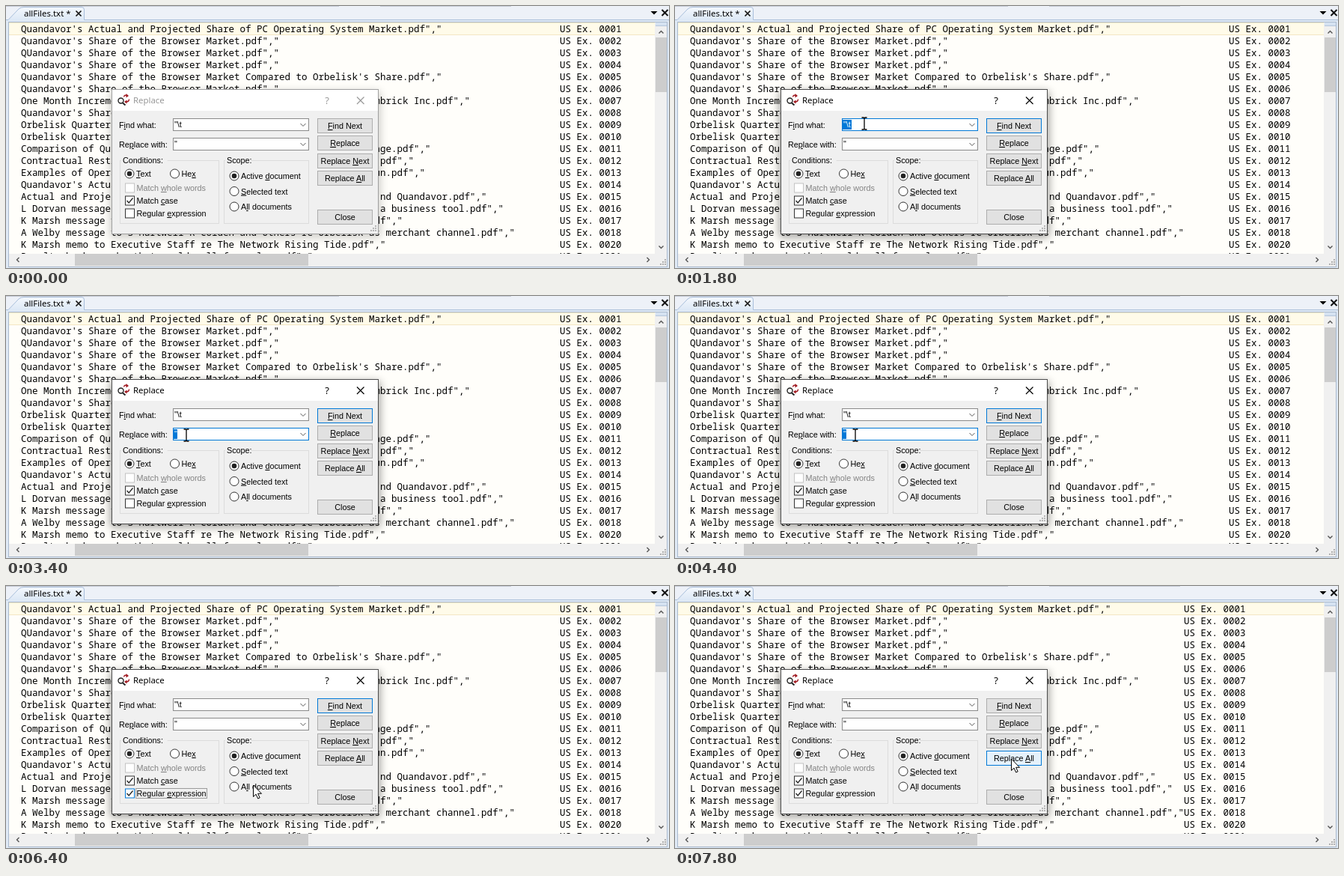
Write an HTML page that moves like this. It is 886 by 350 pixels and loops after 8 s.

```html
<!DOCTYPE html>
<html lang="en">
<head>
<meta charset="utf-8">
<title>Replace dialog</title>
<style>
html, body { margin: 0; width: 100%; height: 100%; overflow: hidden; background: #fff; }
svg { display: block; width: 886px; height: 350px; }
.code { font: 12.5px "Noto Sans Mono", monospace; fill: #000; white-space: pre; }
.ui { font: 10.8px "Liberation Sans", Arial, sans-serif; fill: #000; }
.head { font: 11.4px "Noto Sans", "Open Sans", sans-serif; }
.u { text-decoration: underline; }
.mid { text-anchor: middle; }
</style>
</head>
<body>
<svg id="stage" viewBox="0 0 886 350" xmlns="http://www.w3.org/2000/svg">
  <defs>
    <clipPath id="page"><rect x="4" y="22" width="863" height="309"/></clipPath>
    <filter id="blur" x="-20%" y="-20%" width="140%" height="140%"><feGaussianBlur stdDeviation="6"/></filter>
    <linearGradient id="tabFill" x2="0" y2="1"><stop stop-color="#f4f8fd"/><stop offset="1" stop-color="#dce8f6"/></linearGradient>
  </defs>
  <rect width="886" height="350" fill="#dfe9f5"/>
  <rect width="886" height="18" fill="#edf1f8"/>
  <path d="M0 .5H445M500 .5H675" stroke="#c5cad6"/>
  <path d="M2 19L17 4Q20 1.500 24 1.500H101Q104.500 1.500 104.500 5V19Z" fill="url(#tabFill)"/>
  <path d="M0 18.500H3L17 4Q20 1.500 24 1.500H101Q104.500 1.500 104.500 5V18.500H886" fill="none" stroke="#a9bfdb"/>
  <text class="head" x="24" y="14">allFiles.txt *</text>
  <path d="M93.500 6.500L100.500 13.500M100.500 6.500L93.500 13.500" stroke="#111" stroke-width="1.700"/>
  <path d="M861.500 7H870.500L866 11.500Z"/>
  <path d="M876.500 5L884.500 13M884.500 5L876.500 13" stroke="#111" stroke-width="2"/>
  <rect x="3.500" y="21.500" width="880" height="327" fill="#f0f0f0" stroke="#a9b9cd"/>
  <rect x="4" y="22" width="863" height="309" fill="#fffefa"/>
  <rect x="4" y="22.500" width="863" height="16" fill="#fffbe9"/>
  <path d="M4 22.500H867M4 38.500H867" stroke="#f3e7c4"/>
  <g clip-path="url(#page)"><g id="lines" class="code"></g><g id="labels" class="code"></g></g>

  <rect x="868" y="22" width="15" height="4" fill="#d5e2f1"/>
  <path d="M868 26.500H883" stroke="#b4c6dc"/>
  <rect x="868" y="42" width="15" height="73" fill="#cdcdcd"/>
  <rect x="92" y="331" width="312" height="16" fill="#cdcdcd"/>
  <path d="M872.500 36.500L875.500 33.500L878.500 36.500M872.500 320.500L875.500 323.500L878.500 320.500M17.500 336L14.500 339L17.500 342M856.500 336L859.500 339L856.500 342" fill="none" stroke="#555" stroke-width="1.400"/>
  <g id="pageGrip" fill="#b0b0b0"></g>

  <rect id="shade" x="139" y="114" width="361" height="195" filter="url(#blur)"/>
  <g id="dialog">
    <rect x="141" y="111" width="357" height="194" fill="#f0f0f0"/>
    <rect x="141" y="111" width="357" height="29" fill="#fff"/>
    <rect id="frame" x="141.500" y="111.500" width="356" height="193" fill="none"/>
    <g fill="none" stroke-width="1.400">
      <circle cx="153.500" cy="126.500" r="3.500" fill="#fff" stroke="#222"/>
      <path d="M156 129.500L159.500 132.500" stroke="#222" stroke-width="2"/>
      <path d="M157.500 121.500Q158 118.500 161.500 119.500M164.500 124.500Q164.500 128 160.500 128" stroke="#a01820"/>
    </g>
    <path d="M160.500 117L164 120L160.500 122.500ZM161.500 125.500L158 128L161.500 130.500Z" fill="#a01820"/>
    <text id="title" class="head" x="170" y="130">Replace</text>
    <text id="help" class="head mid" x="429" y="130.500" style="font-size:13px">?</text>
    <path id="shut" d="M469 121.500L478.500 131M478.500 121.500L469 131" stroke-width="1.200"/>
    <g id="controls" class="ui"></g>
  </g>
  <path id="beam" d="M-3.500 -8H-1L0 -7L1 -8H3.500M0 -7V7M-3.500 8H-1L0 7L1 8H3.500" fill="none" stroke="#000" stroke-width="1.300"/>
  <path id="arrow" d="M0 0V15.500L3.600 12.200L6.200 18L8.700 16.900L6.100 11.300H11Z" fill="#fff" stroke="#000"/>
</svg>
<script>
const $ = id => document.getElementById(id);
const NS = "http://www.w3.org/2000/svg";
const BLUE = "#0078d7";

function add(parent, tag, attrs, html) {
  const el = document.createElementNS(NS, tag);
  for (const k in attrs) el.setAttribute(k, attrs[k]);
  if (html) el.innerHTML = html;
  parent.appendChild(el);
  return el;
}
const set = (el, attrs) => { for (const k in attrs) el.setAttribute(k, attrs[k]); };
const show = (el, on) => el.setAttribute("visibility", on ? "visible" : "hidden");

// Document text: [start, optional tail, end column of the tail]
const CW = 7.5, LEFT = 20;
const rows = [
  ["Quandavor's Actual and Projected Share of PC Operating System Market"],
  ["Quandavor's Share of the Browser Market"],
  ["QUandavor's Share of the Browser Market"],
  ["Quandavor's Share of the Browser Market"],
  ["Quandavor's Share of the Browser Market Compared to Orbelisk's Share"],
  ["Quandavor's Share of the Browser Market"],
  ["One Month Increme", "mbrick Inc", 80],
  ["Quandavor's Share"],
  ["Orbelisk Quarterl"],
  ["Orbelisk Quarterl"],
  ["Comparison of Qu", "age", 73],
  ["Contractual Restr", "e", 70],
  ["Examples of Opera", "un", 72],
  ["Quandavor's Actua"],
  ["Actual and Projec", "nd Quandavor", 83],
  ["L Dorvan message ", "a business tool", 86],
  ["K Marsh message t", "l", 68],
  ["A Welby message to S Hartwell R Colden and Others re Orbelisk as merchant channel"],
  ["K Marsh memo to Executive Staff re The Network Rising Tide"],
  ["Results book on who that could sell for sales"]
];
const END = '.pdf","';
rows.forEach(([head, tail, end], i) => {
  const y = 34.5 + 16 * i;
  const cut = head.length < 18;
  add($("lines"), "text", { x: LEFT, y }, cut ? head : head + END);
  if (tail) {
    const s = tail + END;
    add($("lines"), "text", { x: LEFT + (end - s.length) * CW, y }, s);
  }
  const n = i < 18 ? i + 1 : i + 2;
  add($("labels"), "text", { x: 740, y }, "US Ex. " + String(n).padStart(4, "0"));
});

function grip(parent, x, y) {
  for (let r = 0; r < 3; r++)
    for (let c = 0; c <= r; c++)
      add(parent, "rect", { x: x - 3 * c, y: y - 6 + 3 * r, width: 2, height: 2 });
}
grip($("pageGrip"), 880, 344);

// An underscore marks the underlined letter
const ui = $("controls");
const mark = s => s.replace(/_(.)/, '<tspan class="u">$1</tspan>');
const label = (x, y, s, more) => add(ui, "text", { x, y: y + 4, ...more }, mark(s));
const box = (x, y, width, height, fill, stroke) =>
  add(ui, "rect", { x: x + .5, y: y + .5, width, height, fill, stroke });

function group(x, w, name) {
  box(x, 206, w, 84, "none", "#dcdcdc");
  add(ui, "rect", { x: x + 2, y: 200, width: name.length * 5.6, height: 12, fill: "#f0f0f0" });
  label(x + 4, 206, name);
}
function field(y, name, text, w) {
  label(151, y + 9, name);
  const rim = box(223, y, 181, 16, "#fff", "#7a7a7a");
  add(ui, "path", { d: `M393.500 ${y + 7}l3.500 3.500l3.500 -3.500`, fill: "none", stroke: "#555" });
  const sel = add(ui, "rect", { x: 224, y: y + 2, width: w, height: 13, fill: BLUE });
  const txt = add(ui, "text", { x: 225, y: y + 11.5 }, text);
  return { rim, sel, txt };
}
function radio(x, y, name, on) {
  add(ui, "circle", { cx: x, cy: y, r: 6, fill: "#fff", stroke: "#333" });
  if (on) add(ui, "circle", { cx: x, cy: y, r: 3.3, fill: "#222" });
  label(x + 9, y, name);
}
function check(y, name, ink, on) {
  const rim = box(159, y - 6.5, 12, 12, "#fff", ink);
  const tick = add(ui, "path", { d: `M161.500 ${y}l2.700 3l5.300 -6.500`, fill: "none", stroke: "#222", "stroke-width": 1.3 });
  show(tick, on);
  label(174.5, y, name, ink === "#333" ? {} : { fill: "#838383" });
  return { rim, tick };
}
function button(y, name) {
  const b = box(416, y - 10, 73, 19, "#e1e1e1", "#adadad");
  label(453, y, name, { class: "mid" });
  return b;
}

group(152, 132, "Conditions:");
group(291, 113, "Scope:");
const find = field(150, "F_ind what:", '"\\t', 12);
const swap = field(176, "Re_place with:", '"', 5);
radio(165, 224, "_Text", true);
radio(225.5, 224, "He_x", false);
radio(305, 227, "Active _document", true);
radio(305, 247.5, "_Selected text", false);
radio(305, 268, "A_ll documents", false);
check(243, "Match _whole words", "#c4c4c4", false);
check(260, "Match _case", "#333", true);
const regex = check(277, "Regular _expression", "#333", false);
const focus = add(ui, "rect", { x: 173.5, y: 270.5, width: 95, height: 13, fill: "none", stroke: "#444", "stroke-dasharray": "1 1" });
const next = button(160, "_Find Next");
button(183, "_Replace");
button(207, "Replace _Next");
const all = button(230, "Replace _All");
button(282, "Close");
grip(add(ui, "g", { fill: "#b5b5b5" }), 493, 299);

// Pointer path: time, x, y
const path = [
  [600, 54, 215], [1400, 253, 157], [1800, 253, 157], [2600, 242, 190],
  [2800, 241, 186], [4400, 241, 186], [5200, 161.5, 279.5], [5600, 161.5, 279.5],
  [6400, 330.5, 266], [7000, 449.5, 231], [8000, 449.5, 231]
];
function pointer(t) {
  const i = Math.max(1, path.findIndex(p => p[0] > t));
  const a = path[i - 1], b = path[i];
  const k = Math.min(1, Math.max(0, (t - a[0]) / (b[0] - a[0])));
  const e = k * k * (3 - 2 * k);
  return [a[1] + (b[1] - a[1]) * e, a[2] + (b[2] - a[2]) * e];
}

function paintField(f, active, picked, hover) {
  set(f.rim, { stroke: active ? BLUE : hover ? "#222" : "#8a8a8a" });
  show(f.sel, picked);
  set(f.txt, { fill: picked ? "#fff" : "#000" });
}

function draw(now) {
  const t = Math.floor(now % 8000 / 200) * 200;
  const within = (a, b) => t >= a && t < b;
  const active = t >= 1000, over = t >= 7000, done = t >= 7800;

  set($("shade"), { opacity: active ? .36 : .2 });
  set($("frame"), { stroke: active ? "#4d4d4d" : "#a0a0a0" });
  const ink = active ? "#000" : "#999";
  set($("title"), { fill: ink });
  set($("help"), { fill: ink });
  set($("shut"), { stroke: ink });

  const [x, y] = pointer(t);
  const inField = top => x > 223 && x < 404 && y > top && y < top + 17;
  paintField(find, within(1400, 3400), within(1400, 3400), inField(150));
  paintField(swap, within(3400, 5600), within(3400, 5400), inField(176));

  set(regex.rim, { stroke: within(5200, 7600) ? BLUE : "#333" });
  show(regex.tick, t >= 5600);
  show(focus, within(5400, 7600));
  set(next, { stroke: active && t < 7600 ? BLUE : "#adadad" });
  set(all, {
    stroke: over ? BLUE : "#adadad",
    fill: within(7600, 7800) ? "#cce4f7" : over ? "#e5f1fb" : "#e1e1e1"
  });
  set($("labels"), { transform: `translate(${done ? -60 : 0} 0)` });

  const beam = x < 141 || inField(150) || inField(176);
  show($("beam"), t >= 600 && beam);
  show($("arrow"), t >= 600 && !beam);
  set($(beam ? "beam" : "arrow"), { transform: `translate(${x} ${y})` });
}

const start = performance.now();
function loop() {
  draw(performance.now() - start);
  requestAnimationFrame(loop);
}
loop();
</script>
</body>
</html>
```
